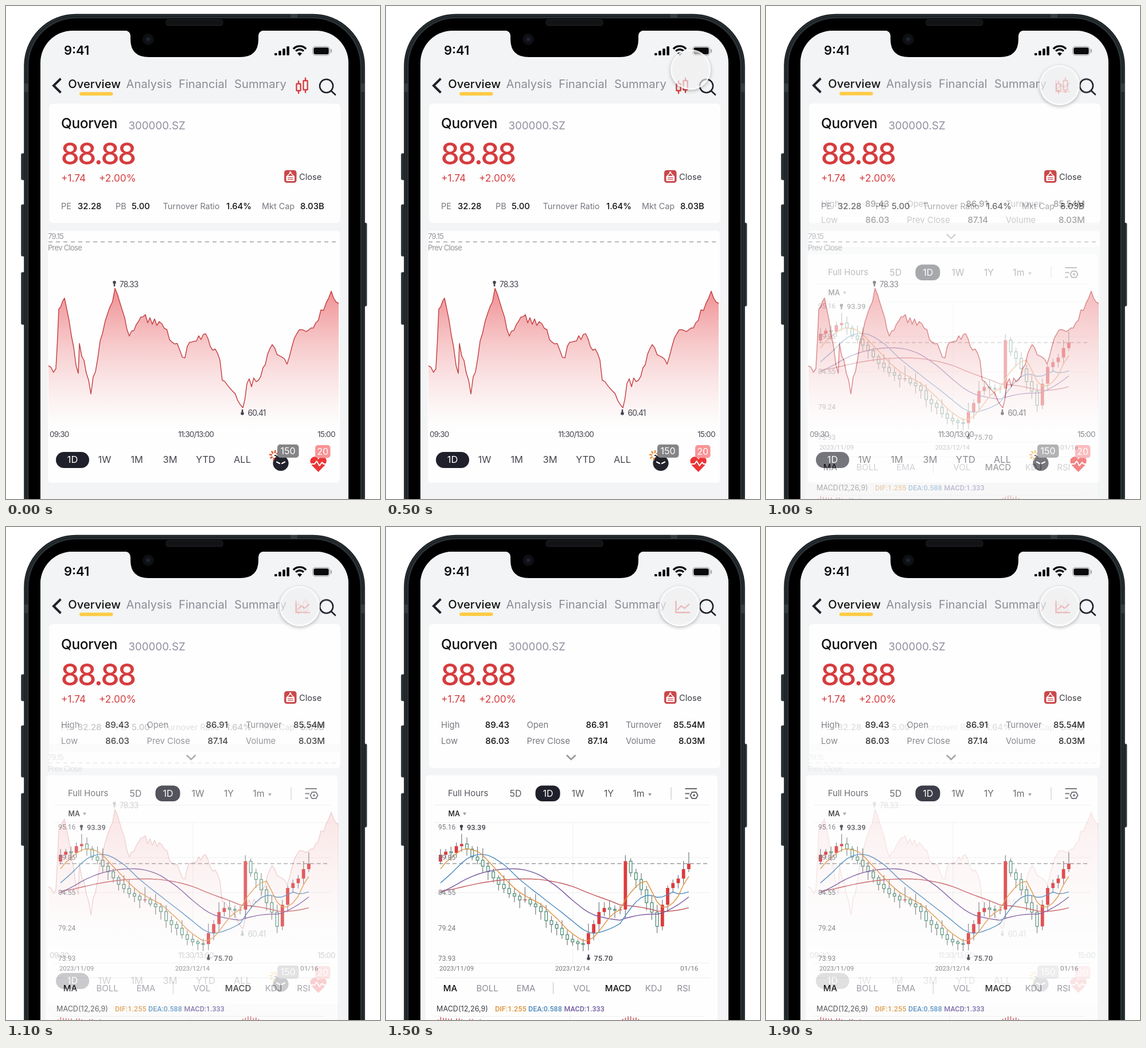
An HTML page for the animation above (2 s loop, 652 by 859 pixels).

```html
<!DOCTYPE html>
<html lang="en">
<head>
<meta charset="utf-8">
<title>Stock app chart switch</title>
<style>
  html, body { margin: 0; width: 100%; height: 100%; overflow: hidden; background: #fff; }
  svg { position: absolute; left: 0; top: 0; font-family: Inter, sans-serif; }
  .axis { font-family: Roboto, sans-serif; }
  #touch {
    position: absolute; left: -35px; top: -35px; width: 70px; height: 70px; border-radius: 50%;
    background: radial-gradient(circle, rgba(240,240,241,.64) 60%, rgba(246,246,246,.74) 100%);
    box-shadow: 0 2px 6px rgba(0,0,0,.28), inset 0 0 3px 2px rgba(255,255,255,.9);
  }
</style>
</head>
<body>
<svg id="stage" width="652" height="859" viewBox="0 0 652 859"></svg>
<div id="touch"></div>
<script>
const RED = '#d63c3e', INK = '#1f202b', GRAY = '#8c8c97', MID = '#77777f', DARK = '#44454e', BLACK = '#0a0a0c';

const text = (x, y, str, size, fill, attrs = '') =>
  `<text x="${x}" y="${y}" font-size="${size}" fill="${fill}" ${attrs}>${str}</text>`;
const rect = (x, y, w, h, r, fill, attrs = '') =>
  `<rect x="${x}" y="${y}" width="${w}" height="${h}" rx="${r}" fill="${fill}" ${attrs}/>`;
const line = (d, color, width = 1, attrs = '') =>
  `<path d="${d}" fill="none" stroke="${color}" stroke-width="${width}" ${attrs}/>`;
const disc = (x, y, r, fill, attrs = '') => `<circle cx="${x}" cy="${y}" r="${r}" fill="${fill}" ${attrs}/>`;
const MIDDLE = ' text-anchor="middle"', END = ' text-anchor="end"', MEDIUM = ' font-weight="500"';
const ROUND = 'stroke-linecap="round" stroke-linejoin="round"';
const tight = amount => ` letter-spacing="${-amount}"`;

// Marker for a high (stem down) or a low (stem up).
const pin = (x, y, dir) => disc(x, y, 2.8, DARK) + line(`M${x} ${y}v${7 * dir}`, DARK, 2.6);

const clamp = v => Math.max(0, Math.min(1, v));
const random = n => {
  const v = Math.sin(n * 12.9898) * 43758.5453;
  return v - Math.floor(v);
};
const range = n => Array.from({ length: n }, (_, i) => i);

// Straight interpolation through [x, y] key points.
function trend(keys, x) {
  const i = Math.max(1, keys.findIndex(key => key[0] >= x));
  const [[x0, y0], [x1, y1]] = [keys[i - 1], keys[i]];
  return y0 + (y1 - y0) * clamp((x - x0) / (x1 - x0));
}

function phone() {
  const key = (x, y, h) => rect(x, y, 9, h, 2, '#2a3034', 'stroke="#454c51" stroke-width=".8"');
  return key(26.5, 257, 46) + key(26.5, 346, 90) + key(26.5, 464, 91) + key(620, 378, 145) +
    rect(32, 14.5, 593, 1000, 90, '#2b3236', 'stroke="#171c1f" stroke-width="1.5"') +
    rect(35.5, 18, 586, 1000, 86.5, 'none', 'stroke="#1b2023" stroke-width="2"') +
    rect(39.5, 21.5, 578, 1000, 83, '#000') +
    rect(32, 135, 7, 15, 0, '#363d41') + rect(618.5, 135, 6.5, 15, 0, '#363d41') +
    rect(496, 14, 12, 7, 0, '#363d41') +
    rect(279, 23.5, 99, 10.5, 4, '#111315', 'stroke="#222528"');
}

function notchAndStatus() {
  const bars = range(4).map(i => rect(468 + 7.1 * i, 82 - 3.9 * i, 4.6, 4 + 3.9 * i, 1.3, BLACK)).join('');
  const arc = (r, w) => line(`M${512 - r * .74} ${85 - r * .68}A${r} ${r} 0 0 1 ${512 + r * .74} ${85 - r * .68}`, BLACK, w);
  return '<path d="M206 42.5Q217 43 217 53V58Q217 89 249 89H408Q440 89 440 58V53Q440 43 451 42.5Z"/>' +
    disc(248, 58, 10, '#0e0f12') + disc(248, 58, 5, '#141821') + disc(248, 58, 2, '#262c3c') +
    text(101, 85, '9:41', 22, BLACK, 'font-weight="600"') + bars +
    arc(15, 3.4) + arc(9.2, 3.3) + `<path d="M512 87l-4.2-4.600q4.200-3 8.400 0Z" fill="${BLACK}"/>` +
    rect(534.5, 70.5, 30, 15.5, 4.5, 'none', 'stroke="#9c9c9e"') +
    rect(536.3, 72.3, 26.4, 11.9, 3, BLACK) + line('M567 76v4.500', '#9c9c9e', 1.8, ROUND);
}

function closedSign() {
  return rect(485, 286, 21.5, 22, 4.5, '#c9494c') + disc(495.7, 290, 1.7, '#fff') +
    line('M490 296.500L495.700 290.500L501.500 296.500', '#fff', 1.4) + rect(488.5, 296, 14.5, 9, 1, '#fff') +
    line('M491 299.200h9.500M491 302.200h9.500', '#c9494c', 1.2);
}

// Parts shared by both pages; dy nudges the header, cardHeight sizes the quote card.
function header(dy, cardHeight) {
  const tabs = [['Overview', 108.3], ['Analysis', 209.6], ['Financial', 301], ['Summary', 398]];
  return rect(60, 43, 537, 820, 0, '#f3f4f5') + `<g transform="translate(0 ${dy})">` +
    line('M95.500 126.500L83 138.700L95.500 151', INK, 4) +
    tabs.map(([label, x], i) => text(x, 143, label, 20.2, i ? GRAY : '#111', i ? '' : MEDIUM)).join('') +
    rect(128, 150, 58.5, 6, 3, '#fecb45') +
    disc(558.5, 139.3, 11.6, 'none', `stroke="${INK}" stroke-width="2.5"`) +
    line('M567 148l7 6.500', INK, 2.7, ROUND) +
    rect(75, 170, 508, cardHeight, 7, '#fefefe') + '</g>' +
    text(96, 213, 'Quorven', 24.5, '#111', MEDIUM + tight(.4)) +
    text(213.5, 215, '300000.SZ', 18.7, '#9090a0') +
    text(95.5, 275.5, '88.88', 51.5, RED, MEDIUM + tight(2.8)) +
    text(96, 306, '+1.74', 17.3, RED) + text(162, 306, '+2.00%', 17.3, RED) +
    closedSign() + text(511, 303, 'Close', 14.6, '#3c3c44');
}

// Turning points of the trading session; the small moves between them are random.
const sessionKeys = [[74, 627], [87, 632], [92, 528], [102, 509], [126, 640], [128, 588], [148, 676], [164, 584],
  [190, 492], [215, 575], [235, 542], [267, 550], [312, 613], [320, 586], [348, 571], [373, 617], [377, 652],
  [413, 700], [420, 658], [440, 652], [464, 590], [490, 624], [507, 571], [540, 552], [567, 497], [580, 518]];

function sessionLine() {
  const points = [sessionKeys[0]];
  sessionKeys.slice(1).forEach(([x1, y1], k) => {
    const [x0] = sessionKeys[k], count = Math.ceil((x1 - x0) / 4.5);
    for (let i = 1; i < count; i++) {
      const x = x0 + (x1 - x0) * i / count;
      points.push([x, trend(sessionKeys, x) + (random(x) - .5) * 16]);
    }
    points.push([x1, y1]);
  });
  return 'M' + points.join('L');
}

function badges() {
  const rays = range(6).map(i => {
    const angle = (100 + 45 * i) * Math.PI / 180, c = Math.cos(angle), s = Math.sin(angle);
    return `M${468 + 4 * c} ${783 + 4 * s}L${468 + 9 * c} ${783 + 9 * s}`;
  }).join('');
  return line('M474 787q-2-4-6-4', INK, 2) + disc(479, 796.5, 13.6, '#23232d') +
    line('M472 794.500l5 2.500M486 794.500l-5 2.500', '#fff', 2.2, ROUND) +
    `<path id="spark" d="${rays}" stroke-width="2.6" fill="none"/>` +
    rect(473, 764, 37.5, 23, 5, '#858588') + text(491.5, 781, '150', 16, '#fff', MIDDLE) +
    '<path d="M544.5 812L533 800Q527 791 534 786.5Q541 783 544.5 790Q549 783 555.5 786.5Q562 791 556 800Z" fill="#eb3637"/>' +
    line('M530 798h8l3.500-5 5 8 4.500-6 2.500 3h5', '#fff', 2, ROUND) +
    rect(539, 765, 26.5, 22.5, 5, '#f99496') + text(552.3, 781.5, '20', 16, '#fff', MIDDLE);
}

function sessionPage() {
  const stats = [['PE', 96, '32.28', 125], ['PB', 191, '5.00', 219], ['Turnover Ratio', 273.5, '1.64%', 384], ['Mkt Cap', 446, '8.03B', 513]];
  const spans = [['1D', 116], ['1W', 172], ['1M', 228], ['3M', 286], ['YTD', 348], ['ALL', 412]];
  const candleIcon = (x, y, h) => rect(x - 3.6, y, 7.2, h, .5, 'none', `stroke="${RED}" stroke-width="2.3"`) +
    line(`M${x} ${y - 5.5}v5.5M${x} ${y + h}v5.5`, RED, 2.3);
  const price = sessionLine();
  return header(0, 208) + candleIcon(510, 135.5, 12) + candleIcon(522, 130, 16) +
    stats.map(([k, x, v, vx]) => text(x, 354, k, 14.4, MID) + text(vx, 354, v, 14.8, '#111', MEDIUM)).join('') +
    rect(73, 391.5, 509, 439, 6, '#fefefe') +
    text(73, 406, '79.15', 13.2, '#97979d', tight(.8)) + text(73, 426, 'Prev Close', 13.2, '#97979d', tight(.8)) +
    line('M74 411H581', '#a3a3a7', 1.3, 'stroke-dasharray="7 6"') +
    `<path d="${price}V736H74Z" fill="url(#fade)"/>` + line(price, '#c64548', 1.5, 'stroke-linejoin="round"') +
    pin(189, 481.5, 1) + text(198, 490, '78.33', 13.8, DARK, tight(.8)) +
    pin(412, 710, -1) + text(421.5, 713.5, '60.41', 13.8, DARK, tight(.8)) +
    text(76, 751, '09:30', 13.6, DARK, tight(.9)) + text(300, 751, '11:30/13:00', 13.6, DARK, tight(.9)) +
    text(543, 751, '15:00', 13.6, DARK, tight(.8)) +
    rect(87, 777, 58, 28, 14, INK) +
    spans.map(([label, x], i) => text(x, 796.3, label, 16.4, i ? DARK : '#fff', MIDDLE)).join('') + badges();
}

// Daily closes: a trend by day number, including the history the averages need, plus noise.
const DAYS = 48;
const closeKeys = [[-30, 600], [-18, 660], [-6, 645], [0, 574], [4, 556], [8, 592], [13, 643], [17, 655], [24, 722],
  [27, 728], [30, 668], [34, 664], [35, 580], [41, 692], [43, 632], [47, 586]];
const closeAt = day => trend(closeKeys, day) + (random(day + 60) - .5) * 9;
const dayX = day => 95 + 9.21 * day;

function candles() {
  return range(DAYS).map(day => {
    const x = dayX(day), open = closeAt(day - 1), close = closeAt(day);
    const top = Math.min(open, close), height = Math.max(1.5, Math.abs(open - close));
    const above = 4 + 18 * random(day + 200) ** 2, below = 3 + 12 * random(day + 300);
    return line(`M${x} ${top - above}V${top + height + below}`, '#77797c', 1.2) + (close < open
      ? rect(x - 2.9, top, 5.8, height, 0, '#dc3b3d')
      : rect(x - 2.3, top, 4.6, height, 0, '#fdfffe', 'stroke="#4d8f73" stroke-width="1.3"'));
  }).join('');
}

function movingAverage(days, color) {
  const points = range(DAYS).map(day =>
    [dayX(day), range(days).reduce((sum, back) => sum + closeAt(day - back), 0) / days]);
  return line('M' + points.join('L'), color, 1.4, 'stroke-linejoin="round"');
}

function macdBars() {
  return range(96).map(i => {
    const swell = Math.max(Math.exp(-i / 9), Math.exp(-(((i - 73) / 3) ** 2)));
    const h = 8 * swell * random(i + 400);
    return h > 1 ? rect(90 + 4.6 * i, 859 - h, 1.6, h, 0, '#c8595b') : '';
  }).join('');
}

function settingsIcon() {
  return line('M521.500 456H542M521.500 464.500H529M521.500 472.500H527', '#66666e', 2) +
    line('M533.500 462h7l3 5.500-3 5.500h-7l-3-5.500Z', '#66666e', 2) + disc(537, 467.5, 1.9, '#66666e');
}

function candlePage() {
  const quotes = [['High', '89.43', 'Low', '86.03'], ['Open', '86.91', 'Prev Close', '87.14'], ['Turnover', '85.54M', 'Volume', '8.03M']];
  const quoteX = [[96, 215], [245.5, 387], [418, 556]];
  const spans = [['5D', 226], ['1D', 282.5], ['1W', 334.5], ['1Y', 388.5], ['1m', 440.5]];
  const studies = [['MA', 112], ['BOLL', 176.5], ['EMA', 244], ['VOL', 341.5], ['MACD', 404.5], ['KDJ', 466.5], ['RSI', 519]];
  const prices = [['95.16', 527], ['89.85', 580], ['84.55', 641], ['79.24', 703], ['73.93', 756]];
  const arrow = (x, y) => `<path d="M${x - 3} ${y - 2.5}h6l-3 5Z" fill="#9a9aa0"/>`;
  const quote = (x, right, y, label, value) => text(x, y, label, 14.8, MID) + text(right, y, value, 15, '#111', MEDIUM + END);
  return header(-1, 251) +
    line('M505.500 128.500V149H530', '#e0544f', 2.4) + line('M508 144.500L514.500 137.500L520.500 141.500L529 134', '#e0544f', 2.2) +
    quotes.map((q, i) => quote(...quoteX[i], 350, q[0], q[1]) + quote(...quoteX[i], 377.5, q[2], q[3])).join('') +
    line('M315 397.500L322.700 405L330.500 397.500', '#96969c', 2.6) +
    rect(69, 432.5, 509, 460, 7, '#fefefe') + text(108, 469, 'Full Hours', 14.8, '#56565e') +
    rect(260.5, 450.5, 43, 27.5, 12, INK) +
    spans.map(([label, x]) => text(x, 469.5, label, 15.8, label === '1D' ? '#fff' : '#56565e', MIDDLE)).join('') +
    arrow(460, 466.5) + line('M497 453.500V475', '#cfcfd3', 1.4) + settingsIcon() +
    line('M84 484.500H565M84 515H565M84 576H565M84 637H565M84 760H565M84 785.500H565M84 852.500H556M326 515V760M321 852V859', '#ededf0') +
    text(108.5, 504, 'MA', 12.5, '#18181c', MEDIUM) + arrow(137, 500) +
    line('M93 586.500H560', '#98989d', 1.3, 'stroke-dasharray="7 4.5"') + candles() +
    movingAverage(30, '#c4585c') + movingAverage(20, '#77569f') + movingAverage(10, '#4e8cc0') + movingAverage(5, '#df923e') +
    '<g class="axis">' + prices.map(([label, y]) => text(91, y - .5, label, 12, MID)).join('') +
    text(93, 773, '2023/11/09', 11.3, MID) + text(295, 773, '2023/12/14', 11.3, MID) + text(513, 773, '01/16', 11.8, MID) +
    text(141, 528, '93.39', 12.8, DARK, MEDIUM) + text(362.5, 756, '75.70', 12.8, DARK, MEDIUM) +
    text(190, 843.5, 'DIF:1.255', 12.7, '#dd943c', MEDIUM) + text(248, 843.5, 'DEA:0.588', 12.5, '#4d8abd', MEDIUM) +
    text(310.5, 843.5, 'MACD:1.333', 12.4, '#6d5a9f', MEDIUM) + '</g>' +
    pin(131.5, 521.5, 1) + pin(353, 752, -1) + line('M291.500 793V814', '#c9c9ce', 1.2) +
    studies.map(([label, x]) => {
      const active = label.startsWith('MA');
      return text(x, 809, label, 15, active ? '#111' : GRAY, MIDDLE + (active ? MEDIUM : ''));
    }).join('') +
    text(88, 843.5, 'MACD(12,26,9)', 12.6, '#3a3a42') + macdBars();
}

document.getElementById('stage').innerHTML =
  `<defs><linearGradient id="fade" gradientUnits="userSpaceOnUse" x1="0" y1="490" x2="0" y2="736">
    <stop stop-color="#e8565b" stop-opacity=".68"/><stop offset="1" stop-color="#f3b0b2" stop-opacity="0"/></linearGradient>
    <clipPath id="screen">${rect(60, 43, 537, 1000, 56, '#fff')}</clipPath></defs>` + phone() +
  `<g clip-path="url(#screen)"><g>${sessionPage()}</g><g id="candlePage">${candlePage()}</g></g>` + notchAndStatus();

const touch = document.getElementById('touch'), spark = document.getElementById('spark');
const page = document.getElementById('candlePage');
const easeInOut = u => u < .5 ? 2 * u * u : 1 - 2 * (1 - u) ** 2;
const LOOP = 2000, STEP = 100, FADE = 260;
const sparkColors = ['#df542c', '#f08f3c', '#f0a93f', '#f2a63e'];

function render(now) {
  const t = Math.floor(now % LOOP / STEP) * STEP;
  const left = 1 - easeInOut(clamp((t - 100) / 620));
  touch.style.transform = `translate(${512 + 76 * left}px, ${138 - 108 * left}px)`;
  touch.style.opacity = clamp((t - 100) / 200);
  page.setAttribute('opacity', clamp((t - 900) / FADE) - clamp((t - 1865) / FADE));
  spark.setAttribute('stroke', sparkColors[t / STEP % sparkColors.length]);
}

function tick() {
  render(performance.now());
  requestAnimationFrame(tick);
}
tick();
</script>
</body>
</html>
```
